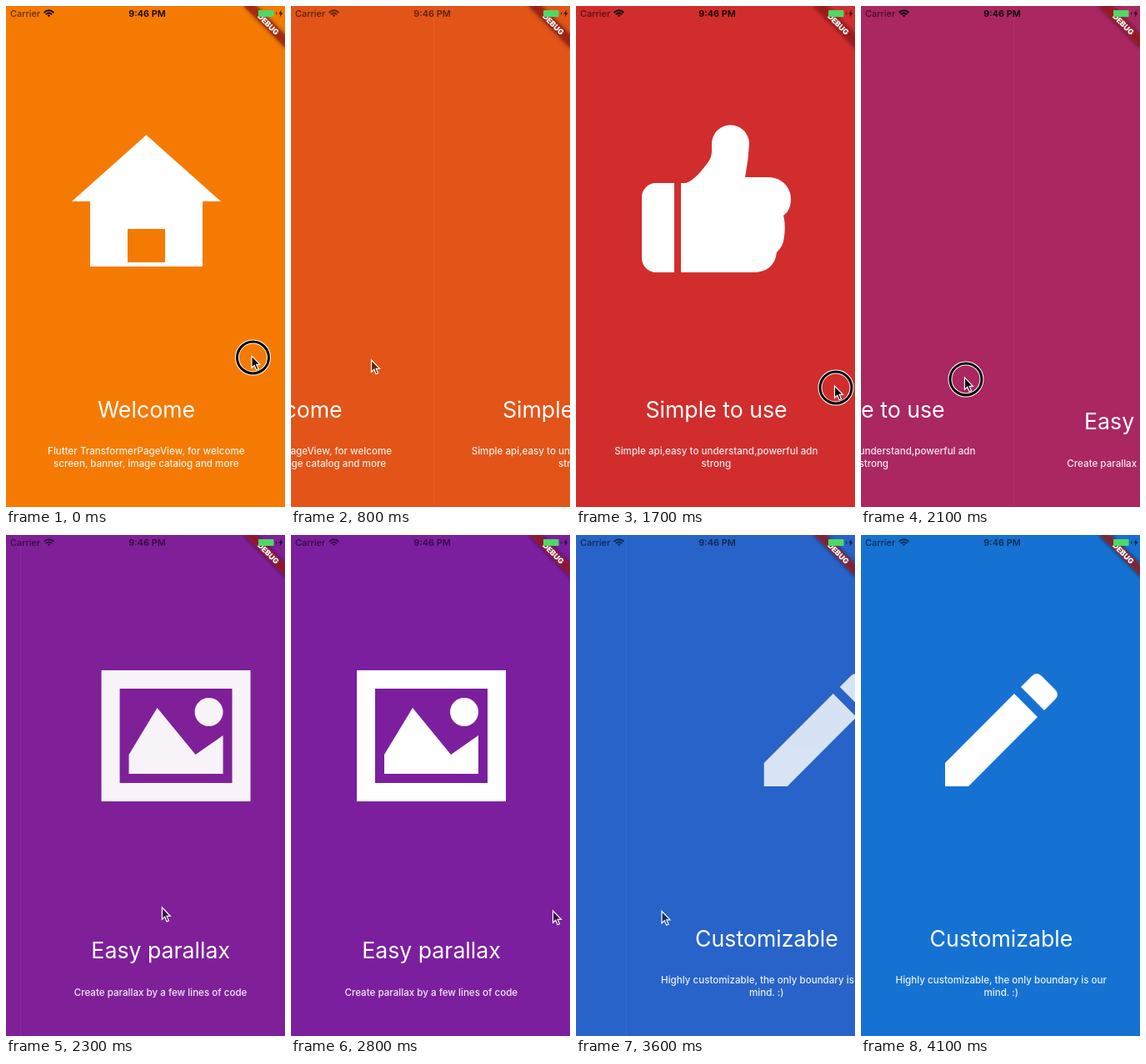
An HTML page for the animation above (4300 ms loop, 335 by 600 pixels).

```html
<!DOCTYPE html>
<html lang="en">
<head>
<meta charset="utf-8">
<title>Welcome pages</title>
<style>
  html, body { margin: 0; width: 100%; height: 100%; overflow: hidden; background: #f57a04; }
  svg { display: block; width: 335px; height: 600px; font-family: Inter, Roboto, sans-serif; fill: #fff; }
  .title { font-size: 26.7px; text-anchor: middle; }
  .sub { font-size: 11.6px; font-weight: 500; text-anchor: middle; fill-opacity: .9; }
  .status { font-size: 10.9px; font-weight: 500; fill: #000; }
  .status .dim { opacity: .6; }
  .time { font-weight: 600; text-anchor: middle; }
  .debug { font-size: 10.2px; font-weight: 900; text-anchor: middle; }
</style>
</head>
<body>
<svg viewBox="0 0 335 600">
  <defs>
    <filter id="soft" x="-30%" y="-100%" width="160%" height="300%"><feGaussianBlur stdDeviation="3"/></filter>
  </defs>
  <rect id="bg" width="335" height="600"/>
  <rect id="seam" width="1" height="600" fill-opacity=".06"/>
  <g id="pages"></g>

  <g transform="translate(336 0) rotate(45) scale(.893)">
    <rect x="-40" y="28" width="80" height="12" fill="#000" fill-opacity=".5" filter="url(#soft)"/>
    <rect x="-40" y="28" width="80" height="12" fill="#b71c1c" fill-opacity=".63"/>
    <text class="debug" x=".6" y="37.7">DEBUG</text>
  </g>

  <g class="status">
    <text class="dim" x="5" y="13">Carrier</text>
    <g id="clock">
      <text class="time" x="169.5" y="13">9:46 PM</text>
      <g fill="none" stroke="#000" stroke-width="1.9">
        <path d="M45.6 8Q51.5 2.6 57.4 8M47.8 10.1Q51.5 6.8 55.2 10.1"/>
        <path d="M51.5 13.2L49.6 11.2Q51.5 9.8 53.4 11.2Z" fill="#000" stroke="none"/>
      </g>
    </g>
    <rect x="303" y="5" width="18.5" height="8" rx=".5" fill="#4cd964"/>
    <path d="M324 7.5h1.3v3h-1.3z" fill-opacity=".5"/>
    <path d="M331 4.5L327.3 9.6H329.6L328.6 13.5L332.5 8.3H330.2Z" fill-opacity=".75"/>
  </g>

  <g id="cursor">
    <g id="ring" fill="none">
      <circle cx="1.5" cy="2" r="19" stroke="#fff" stroke-width="5"/>
      <circle cx="1.5" cy="2" r="19" stroke="#000" stroke-width="3"/>
    </g>
    <path id="arrow" d="M0 0V14.3L3.3 11.3L5.6 16.8L8 15.8L5.7 10.4H10Z" stroke="#fff" stroke-width="1.2"/>
  </g>
</svg>
<script>
const W = 336, PARALLAX = 357, STEP = 100, LOOP = 4300;
const SLOP = 33;      // finger travel before the page follows
const SETTLE = 70;    // time constant of the snap after release
const RETURN = 600;   // time the pointer takes to reach the next swipe
const HOLD = 200;     // press time before the finger moves
const $ = id => document.getElementById(id);

const pages = [
  { color: [245, 122, 4], title: 'Welcome', y: 493,
    sub: ['Flutter TransformerPageView, for welcome', 'screen, banner, image catalog and more'],
    icon: '<path fill-rule="evenodd" d="M168.5 154.5L258 234H236V312H101V234H79ZM146 267V307H191V267Z"/>' },
  { color: [209, 45, 45], title: 'Simple to use', y: 493,
    sub: ['Simple api,easy to understand,powerful adn', 'strong'],
    icon: '<rect x="79" y="212" width="60" height="107" rx="17" clip-path="inset(0 21px 0 0)"/>' +
      '<path d="M126 212H132C142 209 153 195 160 185Q163 180 163 173V165A22.3 22.3 0 0 1 208 165' +
      'Q207 185 203 205H230C247 205 258 217 258 231Q258 245 249 251Q252 262 250 276' +
      'Q249 288 241 295Q238 319 212 319H126Z"/>' },
  { color: [123, 31, 159], title: 'Easy parallax', y: 507,
    sub: ['', 'Create parallax by a few lines of code'],
    icon: '<path fill-rule="evenodd" d="M79 162H258V319H79ZM101 184V297H236V184Z"/>' +
      '<path d="M112 263L146 207L192 263L225 240V286H112Z"/><circle cx="208" cy="212" r="17"/>' },
  { color: [22, 114, 210], title: 'Customizable', y: 493,
    sub: ['Highly customizable, the only boundary is our', 'mind. :)'],
    icon: '<path d="M101 273L184 190L212 218L129 301H101Z"/>' +
      '<path d="M192 182L205 169Q211 163 217 169L233 185Q239 191 233 197L220 210Z"/>' }
];

// One swipe per page change: finger moves from a to b between start and end.
const swipes = [
  { start: 100, end: 800, a: [295, 419], b: [96.5, 424] },
  { start: 1700, end: 2150, a: [310.5, 455], b: [88.5, 443] },
  { start: 3050, end: 3533, a: [314.5, 450], b: [103, 450.5] }
];

$('pages').innerHTML = pages.map(p => `<g><g>${p.icon}</g>
  <text class="title" x="168.5" y="${p.y}">${p.title}</text>
  ${p.sub.map((s, i) => `<text class="sub" x="168.3" y="${537.3 + 14.2 * i}">${s}</text>`).join('')}</g>`).join('');
const layers = [...$('pages').children];

const clamp = v => Math.min(1, Math.max(0, v));
const mix = (a, b, f) => a.map((v, i) => v + (b[i] - v) * f);
const easeIn = u => u ** 1.5;
const easeOut = u => 1 - (1 - u) ** 2;
const finger = (s, t) => mix(s.a, s.b, easeIn(clamp((t - s.start) / (s.end - s.start))));

// How far one swipe has moved its page, 0 to 1.
function progress(s, t) {
  const dragged = Math.max(0, s.a[0] - finger(s, t)[0] - SLOP) / W;
  if (t <= s.end) return dragged;
  const rest = (1 - dragged) * Math.exp((s.end - t) / SETTLE);
  return rest < .005 ? 1 : 1 - rest;
}

function pointer(t) {
  const i = swipes.findLastIndex(s => t > s.end), next = swipes[i + 1];
  if (!next) return swipes[i].b;
  if (i < 0 || t >= next.start) return finger(next, t);
  return mix(swipes[i].b, next.a, easeOut(clamp((t - swipes[i].end) / RETURN)));
}

const show = (el, on) => { el.style.display = on ? '' : 'none'; };

function draw(t) {
  const pos = swipes.reduce((sum, s) => sum + progress(s, t), 0);
  const i = Math.min(Math.floor(pos), pages.length - 2), f = pos - i;
  $('bg').setAttribute('fill', `rgb(${mix(pages[i].color, pages[i + 1].color, f).map(Math.round)})`);
  $('seam').setAttribute('x', Math.round((1 - f) * W));
  show($('seam'), f > 0 && f < 1);

  layers.forEach((layer, n) => {
    const d = n - pos, icon = layer.firstChild;
    show(layer, Math.abs(d) < 1);
    layer.setAttribute('transform', `translate(${d * W} 0)`);
    icon.setAttribute('transform', `translate(${d * PARALLAX} 0)`);
    icon.setAttribute('opacity', clamp(1 - Math.abs(d)));
  });

  const down = swipes.some(s => t >= s.start - HOLD && t < s.end);
  $('cursor').setAttribute('transform', `translate(${pointer(t)})`);
  show($('cursor'), t < swipes[2].end + 300);
  show($('ring'), down);
  $('arrow').setAttribute('fill', down ? '#000' : 'rgba(0,0,0,.55)');
  $('clock').setAttribute('opacity', down ? .95 : .6);
}

const begin = performance.now();
function tick() {
  const t = (performance.now() - begin) % LOOP;
  draw(Math.floor(t / STEP) * STEP);
  requestAnimationFrame(tick);
}
tick();
</script>
</body>
</html>
```
